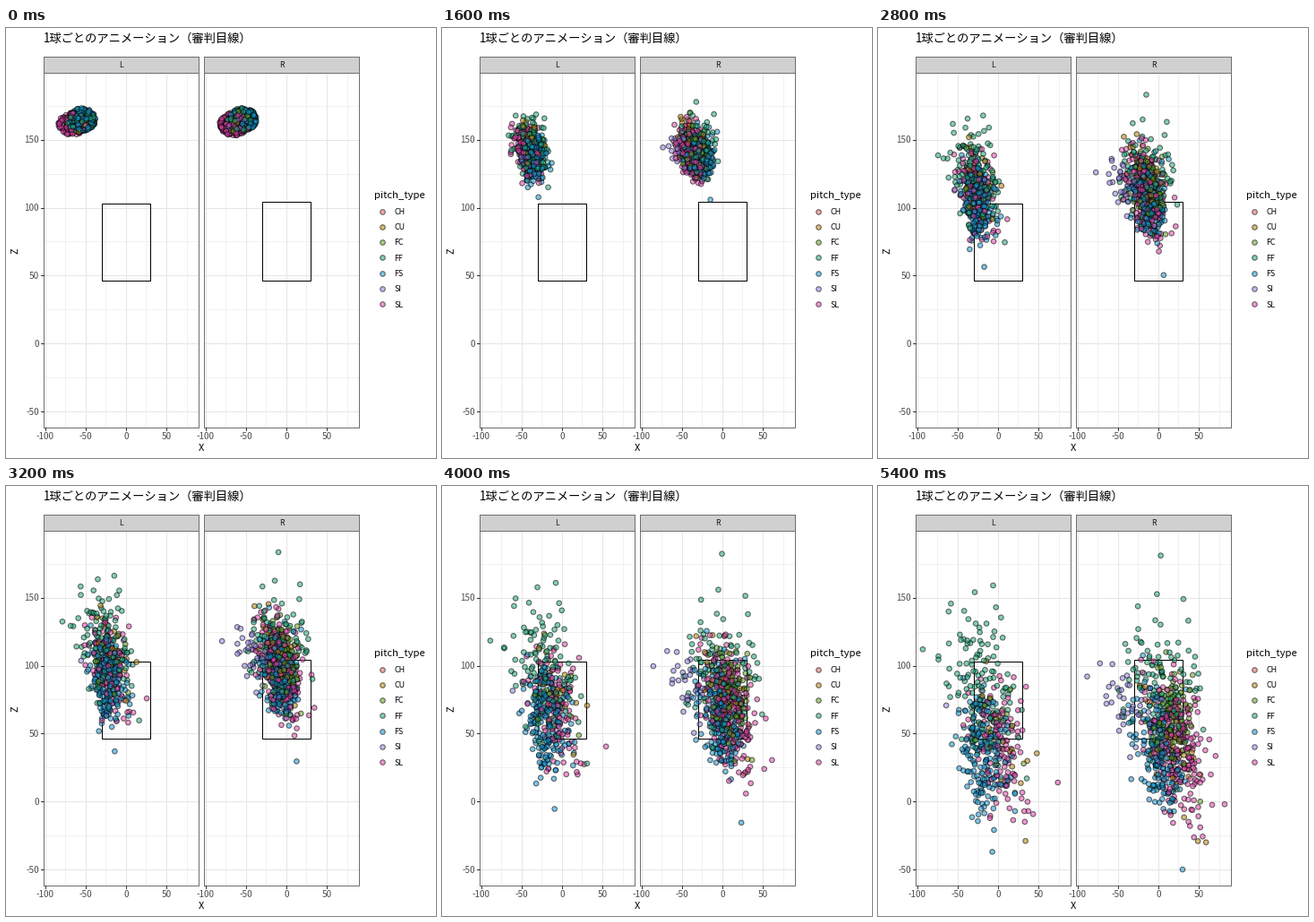
Recreate the animation shown at these times as a matplotlib script. Size 480x480 px, loop 5.5 s.

```python
import numpy as np
import matplotlib.pyplot as plt
from matplotlib.animation import FuncAnimation
from matplotlib.patches import Rectangle

SIZE, DPI = 480, 72
FRAMES, INTERVAL = 55, 100
STRIP, TOP, BOTTOM = 32, 50, 446
X_LIM, Z_LIM = (-101.8, 89.8), (-61.8, 199.2)
DARK, GREY = "#333333", "#4D4D4D"

plt.rcParams["font.family"] = ["Noto Sans CJK JP", "DejaVu Sans"]
rng = np.random.default_rng(18)

# colour, drop, sideways run, release shift, count per side, mean, spread
PITCHES = {
    "CH": ("#DF6468", 7.5, -3, 0, (2, 4), (4, 58), (11, 14)),
    "CU": ("#B58407", 11.0, 1, 0, (20, 26), (16, 50), (20, 28)),
    "FC": ("#62A01F", 6.3, 0, 1, (22, 105), (18, 60), (13, 20)),
    "FF": ("#1FA87A", 4.2, -2, 5, (115, 110), (1, 88), (21, 25)),
    "FS": ("#1596D0", 7.3, -3, 6, (190, 195), (2, 38), (15, 24)),
    "SI": ("#8F82E2", 5.5, -3, -4, (1, 33), (-38, 72), (21, 17)),
    "SL": ("#E244AB", 8.6, 1, -5, (117, 232), (24, 40), (18, 24)),
}

# side: panel edges, mean shift, release x, strike zone bottom and top, extremes
SIDES = {
    "L": (42, 215, -20, -61, (46.3, 102.7),
          [("FF", -93, 112), ("FF", -6, 159), ("FS", -7, -37),
           ("SL", 74, 14), ("CU", 34, -29)]),
    "R": (221, 394, 0, -60, (46, 104.3),
          [("FF", 3, 181), ("FF", 31, 149), ("FS", 30, -50),
           ("SL", 82, -2), ("SI", -88, 92), ("CU", 59, -30)]),
}


class Cloud:
    """All pitches of one panel, in random drawing order."""

    def __init__(self, side):
        _, _, shift, release, _, extremes = SIDES[side]
        index = list(SIDES).index(side)
        landings = list(extremes)
        for kind, (_, drop, _, _, counts, mean, spread) in PITCHES.items():
            u, v = np.clip(rng.normal(size=(2, counts[index])), -2.6, 2.6)
            tilt = -drop / 25
            v = tilt * u + np.sqrt(1 - tilt ** 2) * v
            x = mean[0] + shift + spread[0] * u
            z = mean[1] + spread[1] * v
            landings += zip([kind] * len(x), x, z)

        landings = [landings[i] for i in rng.permutation(len(landings))]
        kinds = [PITCHES[kind] for kind, _, _ in landings]
        n = len(kinds)
        self.end = np.array([point[1:] for point in landings])
        self.colors = [k[0] for k in kinds]
        drop, run, offset = np.array([k[1:4] for k in kinds]).T

        angle = rng.uniform(0, 2 * np.pi, n)
        radius = np.sqrt(rng.uniform(0, 1, n))
        self.start = np.column_stack([
            release + offset + 17.5 * radius * np.cos(angle),
            163 + 0.3 * offset + 8.5 * radius * np.sin(angle)])

        # the more a pitch drops, the longer it flies
        self.acc = np.column_stack([run, -drop])
        flight = 3.95 + drop * rng.normal(0.085, 0.012, n)
        self.time = np.minimum(flight, 5.4)[:, None]

    def at(self, t):
        """Ballistic position; each pitch stops once it reaches the plate."""
        t = np.minimum(t, self.time)
        s = t / self.time
        return (self.start * (1 - s) + self.end * s
                + 0.5 * self.acc * t * (t - self.time))


fig = plt.figure(figsize=(SIZE / DPI, SIZE / DPI), dpi=DPI, facecolor="white")


def pixel_axes(left, top, right, bottom, face="white"):
    box = [left, SIZE - bottom, right - left, bottom - top]
    ax = fig.add_axes([v / SIZE for v in box], facecolor=face)
    ax.set(xticks=[], yticks=[])
    for spine in ax.spines.values():
        spine.set(color="#6E6E6E", linewidth=1)
    return ax


stage = pixel_axes(0, 0, SIZE, SIZE)
stage.set(xlim=(0, SIZE), ylim=(SIZE, 0), zorder=5)
stage.axis("off")


def label(x, y, text, size, color="black", ha="left", **kw):
    stage.text(x, y, text, fontsize=size, color=color, ha=ha,
               **{"va": "baseline", **kw})


def tick(xs, ys):
    stage.plot(xs, ys, color=DARK, lw=1)


def dots(ax, x, y, colors):
    return ax.scatter(x, y, s=31, c=colors, edgecolors="black",
                      linewidths=1.1, alpha=0.55, zorder=2)


def to_pixel(value, limits, start, end):
    return start + (value - limits[0]) * (end - start) / (limits[1] - limits[0])


def draw_panel(side):
    left, right, _, _, (low, high), _ = SIDES[side]
    pixel_axes(left, STRIP, right, TOP, "#D0D0D0")
    label((left + right) / 2, 44.3, side, 8.8, "#1A1A1A", "center")

    ax = pixel_axes(left, TOP, right, BOTTOM)
    ax.set(xlim=X_LIM, ylim=Z_LIM)
    for first, width in ((-75, 0.55), (-100, 1.07)):
        for value in range(first, 200, 50):
            ax.axvline(value, color="#E6E6E6", lw=width, zorder=0.5)
            ax.axhline(value, color="#E6E6E6", lw=width, zorder=0.5)
    ax.add_patch(Rectangle((-30.2, low), 60.6, high - low,
                           fill=False, ec="black", lw=1))

    for x in range(-100, 100, 50):
        px = to_pixel(x, X_LIM, left, right)
        tick([px, px], [BOTTOM, BOTTOM + 3])
        label(px, 459.4, str(x), 10, GREY, "center")

    cloud = Cloud(side)
    return cloud, dots(ax, *cloud.at(0).T, cloud.colors)


panels = [draw_panel(side) for side in SIDES]

for z in range(-50, 200, 50):
    y = to_pixel(z, Z_LIM, BOTTOM, TOP)
    tick([39, 42], [y, y])
    label(37, y + 3.6, str(z), 10, GREY, "right")

label(42, 16, "1球ごとのアニメーション（審判目線）", 13.25)
label(218, 471.5, "X", 11, ha="center")
label(10, 248.5, "Z", 11, ha="center", va="center", rotation=90)
label(410.5, 190, "pitch_type", 11.3)
for i, (kind, pitch) in enumerate(PITCHES.items()):
    y = 204.5 + 17.28 * i
    dots(stage, [420], [y], [pitch[0]])
    label(433.5, y + 3.4, kind, 8.9)


def update(frame):
    t = frame * INTERVAL / 1000
    for cloud, artist in panels:
        artist.set_offsets(cloud.at(t))
    return [artist for _, artist in panels]


anim = FuncAnimation(fig, update, frames=FRAMES, interval=INTERVAL,
                     repeat=True, repeat_delay=0, blit=False)
plt.show()
```
